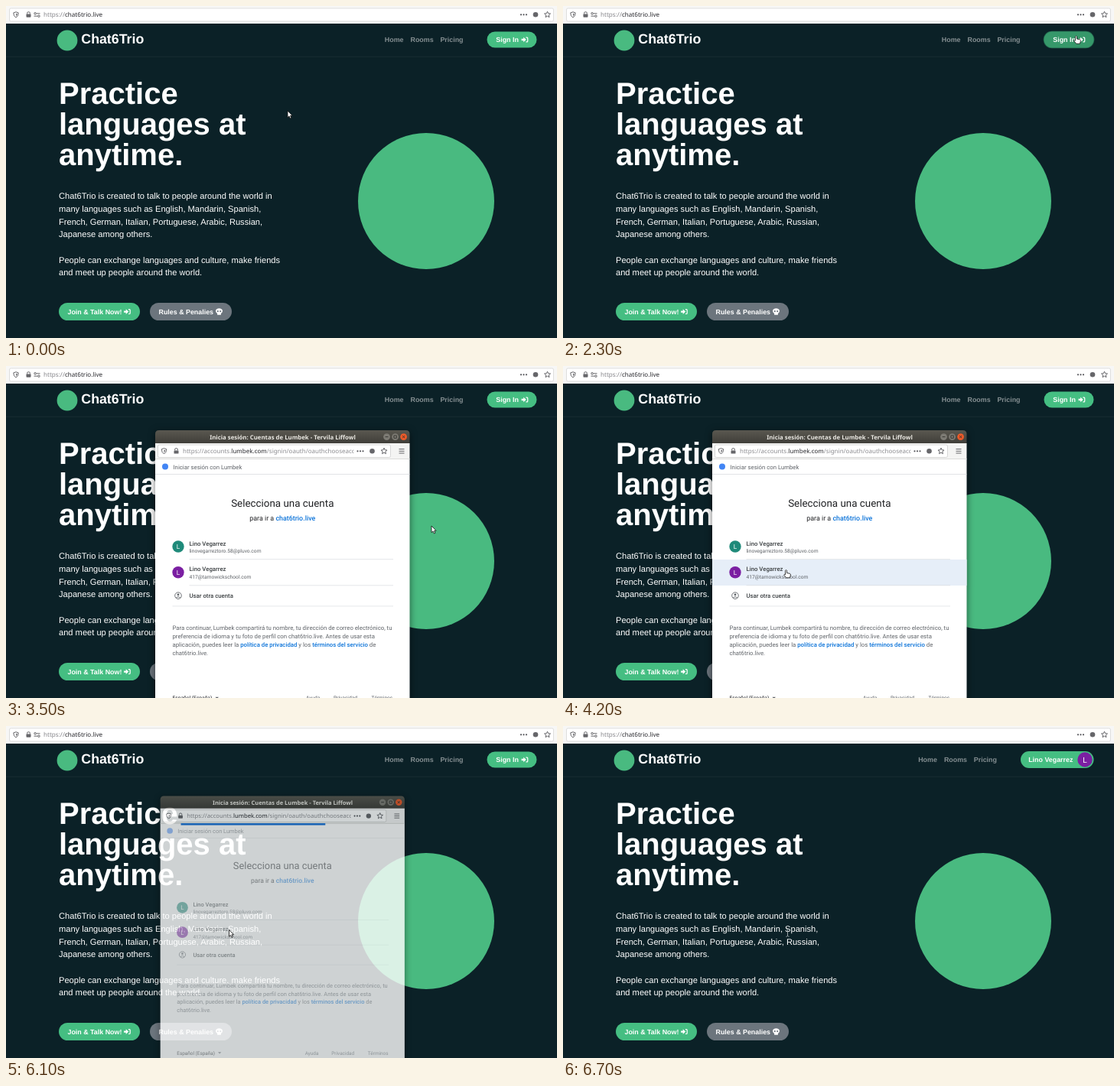
An HTML page for the animation above (8 s loop, 720 by 434 pixels).

```html
<!DOCTYPE html>
<html lang="en">
<head>
<meta charset="utf-8">
<title>Sign-in demo</title>
<style>
  html, body { margin: 0; width: 100%; height: 100%; overflow: hidden; background: #0b2127; }
  svg { display: block; width: 720px; height: 434px; }
  text { white-space: pre; text-rendering: geometricPrecision; }
  .page { font-family: "Liberation Sans", Arial, sans-serif; fill: #fff; }
  .ui { font-family: "Noto Sans", sans-serif; }
  .form { font-family: Roboto, sans-serif; fill: #5f6368; }
  .bold { font-weight: 700; }
  .mid { font-weight: 500; }
  .link { font-weight: 500; fill: #0b73d9; }
  .dark { fill: #202124; }
  .line { fill: none; stroke: #66666a; stroke-width: 1; }
  #popup { transform-box: view-box; transform-origin: 361.5px 269px; filter: drop-shadow(0 2px 5px rgba(0, 0, 0, .55)); }
</style>
</head>
<body>
<svg id="stage" viewBox="0 0 720 434"></svg>
<script>
const LOOP = 8000;
const GREEN = '#45be82', PURPLE = '#7b1fa2';
const BRAND = 'Chat6Trio', SITE = 'chat6trio.live';
const FIRM = 'Lumbek', BROWSER = 'Tervila Liffowl', USER = 'Lino Vegarrez';

const text = (x, y, size, str, cls = '', more = '') =>
  `<text x="${x}" y="${y}" font-size="${size}" class="${cls}" ${more}>${str}</text>`;
const rect = (x, y, w, h, fill, r = 0, more = '') =>
  `<rect x="${x}" y="${y}" width="${w}" height="${h}" rx="${r}" fill="${fill}" ${more}/>`;
const circle = (x, y, r, fill, more = '') =>
  `<circle cx="${x}" cy="${y}" r="${r}" fill="${fill}" ${more}/>`;
const lines = (x, y, gap, size, rows, cls) =>
  rows.map((row, i) => row && text(x, y + i * gap, size, row, cls)).join('');
const at = (x, y, body, more = '') => `<g transform="translate(${x} ${y})" ${more}>${body}</g>`;
const mid = 'text-anchor="middle"';

// Icons are centred on 0,0
const enter = '<path d="M-4.4-1.2h2.6v-2.1L1.7 0l-3.5 3.3V1.2h-2.6z" fill="#fff"/>' +
  '<path d="M1.4-2.9h1.4q.9 0 .9.9v4q0 .9-.9.9H1.4" fill="none" stroke="#fff" stroke-width="1.2"/>';
const skull = '<path d="M-2.4 4.2V2.5Q-4.5 1.2-4.5-.8C-4.5-3-2.6-4.4 0-4.4S4.5-3 4.5-.8Q4.5 1.2 2.4 2.5v1.7z" fill="#fff"/>' +
  circle(-1.7, -.5, 1.1, '#6c757d') + circle(1.7, -.5, 1.1, '#6c757d');
const shield = '<path class="line" d="M0-3.7 3.2-2.6Q3.2 2 0 3.7-3.2 2-3.2-2.6z"/><path d="M0-1.8V1.9Q1.5 1 1.6-1.3z" fill="#66666a"/>';
const lock = rect(-3, -.6, 6, 4.2, '#66666a', .7) + '<path class="line" d="M-1.8-.6V-2Q-1.8-3.5 0-3.5T1.8-2v1.4"/>';
const sliders = '<path class="line" d="M-.8-1.7H4M-4 1.7H.8"/><circle class="line" cx="-2.4" cy="-1.7" r="1.3"/><circle class="line" cx="2.4" cy="1.7" r="1.3"/>';
const dots = [-3.5, 0, 3.5].map(x => circle(x, 0, 1.1, '#55555a')).join('');
const star = `<path class="line" stroke-linejoin="round" d="M${Array.from({ length: 10 }, (_, i) => {
  const r = i % 2 ? 1.9 : 4.2, a = i * Math.PI / 5;
  return (r * Math.sin(a)).toFixed(2) + ' ' + (-r * Math.cos(a)).toFixed(2);
}).join('L')}z"/>`;
const barIcons = (x, y) => at(x, y, dots) + circle(x + 15.5, y, 3.3, '#66666a') + at(x + 31, y, star);

const topBar = rect(0, 0, 720, 23, '#f7f7f6') +
  rect(4.5, 3, 711, 17, '#fff', 2, 'stroke="#d6d6d6" stroke-width=".8"') +
  at(13, 11.5, shield) + at(29.5, 11.2, lock) + at(40.5, 11.5, sliders) +
  text(49, 14.3, 8.1, `<tspan fill="#85858a">https://</tspan>${SITE}`, 'ui', 'fill="#26262b"') +
  barIcons(676.5, 11.3);

const landing = `<g class="page">
  ${rect(0, 22, 720, 412, '#0b2127')}${rect(0, 65.8, 720, .8, '#1c3136')}
  ${circle(80, 45, 13.4, '#49ba80')}${text(98.3, 49.4, 17.78, BRAND, 'bold')}
  <g id="nav" class="bold" fill="#858f92">
    ${text(494.8, 47, 8.89, 'Home')}${text(528.5, 47, 8.89, 'Rooms')}${text(567.4, 47, 8.89, 'Pricing')}
  </g>
  <g id="signin">
    ${rect(627.7, 32.7, 66.6, 22.6, '#246b50', 11.3, 'id="ring"')}
    ${rect(628.5, 33.5, 65, 21, GREEN, 10.5, 'id="pill"')}
    ${text(640.3, 47, 8.89, 'Sign In', 'bold')}${at(678, 44, enter)}
  </g>
  <g id="account">
    ${rect(598, 33, 95.5, 22, GREEN, 11)}${text(637.3, 47, 8.89, USER, 'bold', mid)}
    <g id="avatar">${circle(682, 44, 9.7, PURPLE)}${text(682, 47.6, 10, 'L', 'form', mid + ' style="fill:#fff"')}</g>
  </g>
  ${lines(69, 128, 40, 40, ['Practice', 'languages at', 'anytime.'], 'bold')}
  ${lines(69, 252.4, 16.67, 11.11, [
    BRAND + ' is created to talk to people around the world in',
    'many languages such as English, Mandarin, Spanish,',
    'French, German, Italian, Portuguese, Arabic, Russian,',
    'Japanese among others.', '',
    'People can exchange languages and culture, make friends',
    'and meet up people around the world.'])}
  ${circle(549, 255, 89, '#49ba80')}
  ${rect(69, 388, 106, 23, GREEN, 11.5)}${text(80.5, 402.6, 8.89, 'Join &amp; Talk Now!', 'bold')}${at(158.5, 399.6, enter)}
  ${rect(188, 388, 107, 23, '#6c757d', 11.5)}${text(199.5, 402.6, 8.89, 'Rules &amp; Penalies', 'bold')}${at(278.5, 399.6, skull)}
</g>`;

const account = (y, color, mail) =>
  circle(225, y, 7.7, color) + text(225, y + 3, 8.3, 'L', '', mid + ' style="fill:#fff"') +
  text(239.5, y - 1.5, 7.78, USER, 'mid', 'style="fill:#3c4043"') + text(239.5, y + 8.2, 6.67, mail);
const rule = (x, y) => rect(x, y, 506 - x, .7, '#dadce0');

const form = `<g id="form" class="form">
  ${circle(208, 131.5, 4, '#4285f4')}${text(218.5, 134.5, 7.78, 'Iniciar sesión con ' + FIRM)}
  ${rect(195, 141, 332.5, .8, '#dadce0')}
  ${text(361.3, 183.6, 13.4, 'Selecciona una cuenta', 'dark', mid)}
  ${text(361.3, 202.3, 8.89, `para ir a <tspan class="link">${SITE}</tspan>`, 'dark', mid)}
  ${rect(195, 253, 332.5, 34, '#e6eef8', 0, 'id="hover"')}
  ${account(236, '#1f8a7a', 'linovegarreztoro.58@pluvo.com')}${rule(239.5, 252.4)}
  ${account(269.7, PURPLE, '417@tarnowickschool.com')}${rule(239.5, 286.5)}
  <circle cx="225" cy="300.2" r="4.3" fill="none" stroke="#5f6368" stroke-width=".9"/>
  ${circle(225, 298.9, 1.4, '#5f6368')}<path d="M222.2 303Q225 300.2 227.8 303" fill="none" stroke="#5f6368" stroke-width=".9"/>
  ${text(239.5, 303, 7.78, 'Usar otra cuenta', 'mid', 'style="fill:#3c4043"')}${rule(217.5, 313.6)}
  ${lines(217.5, 345.1, 11.11, 7.78, [
    `Para continuar, ${FIRM} compartirá tu nombre, tu dirección de correo electrónico, tu`,
    `preferencia de idioma y tu foto de perfil con ${SITE}. Antes de usar esta`,
    'aplicación, puedes leer la <tspan class="link">política de privacidad</tspan> y los <tspan class="link">términos del servicio</tspan> de',
    SITE + '.'])}
  ${text(217.5, 436.4, 6.67, 'Español (España)', 'dark')}<path d="M273.5 432.8h4.4l-2.2 2.4z"/>
  ${text(392, 436.4, 6.67, 'Ayuda')}${text(428, 436.4, 6.67, 'Privacidad')}${text(477.5, 436.4, 6.67, 'Términos')}
</g>`;

const popup = `<g id="popup">
  <path d="M195 102V89q0-5 5-5h322.5q5 0 5 5v13z" fill="url(#chrome)"/>
  ${text(361.5, 95.6, 7.8, '', 'ui bold', mid + ' id="title" fill="#eceae4"')}
  ${circle(497.5, 92.6, 4.4, '#7d7b74')}${circle(508.6, 92.6, 4.4, '#7d7b74')}${circle(519.6, 92.6, 4.4, '#ec5a29')}
  <path d="M495.6 92.6h3.8M506.9 90.9h3.4v3.4h-3.4zM518 91l3.2 3.2m0-3.2L518 94.2" fill="none" stroke="#34332f" stroke-width=".9"/>
  ${rect(195, 101, 332.5, 21, '#f4f4f3')}${rect(198.5, 103, 304, 16.5, '#fff', 2, 'stroke="#cfcfce" stroke-width=".8"')}
  ${at(206.5, 111.3, shield)}${at(222.5, 111, lock)}
  <g clip-path="url(#urlBox)">${text(231, 114.2, 8, '', 'ui', 'id="url" fill="#8c8c90"')}</g>
  ${barIcons(463, 111.3)}<path class="line" d="M513.5 108.6h7m-7 2.7h7m-7 2.7h7"/>
  ${rect(195, 121.4, 332.5, 332, '#fff')}${rect(195, 121, 332.5, .7, '#d0d0cf')}
  ${form}${rect(195, 121.2, 0, 2.6, '#1a73d8', 0, 'id="bar"')}
</g>`;

const pen = 'fill="#fff" stroke="#111" stroke-width=".8" stroke-linejoin="round"';
const cursors = `<g id="cursor">
  <path id="arrow" ${pen} d="M0 0v8.7l2-1.8 1.4 3.1 1.5-.7-1.4-3H6.1z"/>
  <path id="hand" ${pen} d="M-1 .8Q0-.6 1 .8V4l4 .9q1.1.4.9 1.6L5 10.3H.2L-2.8 6.6Q-2.6 5.2-1 6.2z"/>
  <path id="beam" d="M0 -1.2q1.6 0 2 1 .4-1 2-1M2-.2v8M0 8.8q1.6 0 2-1 .4 1 2 1" fill="none" stroke="#aab4b6" stroke-width=".9"/>
</g>`;

document.getElementById('stage').innerHTML = `<defs>
  <linearGradient id="chrome" x2="0" y2="1"><stop stop-color="#5a5850"/><stop offset="1" stop-color="#3e3d38"/></linearGradient>
  <clipPath id="urlBox"><rect x="231" y="103" width="223.5" height="17"/></clipPath>
</defs>${landing}${topBar}${popup}${cursors}`;

// Each row: start time, then the values held until the next row
const path = [
  [0, 368, 137], [1200, 371, 151], [1300, 386, 166], [1400, 422, 168], [1500, 472, 150],
  [1600, 532, 115], [1700, 592, 79], [1800, 640, 52], [1900, 664, 42], [2000, 670.5, 39],
  [3000, 667, 46], [3100, 650, 72], [3200, 622, 112], [3300, 590, 158], [3400, 566, 194], [3500, 556, 209],
  [3900, 500, 240], [4000, 410, 282], [4100, 325, 290], [4200, 291.5, 266.5]
];
const pose = [
  [0, 1, 0], [2400, .85, .15], [2500, .91, .5], [2600, .97, .85], [2700, 1, 1],
  [6100, .96, .8], [6200, .88, .42], [6300, 1, 0]
];
const shape = [[0, 'arrow'], [2000, 'hand'], [3000, 'arrow'], [3900, 'hand'], [4700, 'arrow'], [6200, 'beam']];
const titles = [[0, BROWSER], [3200, `Inicia sesión: Cuentas de ${FIRM} - ${BROWSER}`]];
const host = `https://accounts.<tspan fill="#26262b">${FIRM.toLowerCase()}.com</tspan>/signin/oauth`;
const urls = [[0, ''], [2800, host + '?client_id=381398'], [3200, host + '/oauthchooseaccount']];
const formFade = [[0, 0], [3300, 1], [4800, .75], [4900, .5]];
const pills = [[0, GREEN], [1900, '#41b478'], [2000, '#3ba870'], [2100, '#36986a'], [2600, '#3ba570'], [3000, GREEN]];

const held = (table, t) => table.findLast(row => row[0] <= t).slice(1);
const $ = id => document.getElementById(id);
const show = (id, on) => { $(id).style.display = on ? '' : 'none'; };
const fillText = (id, str) => { if ($(id).dataset.now !== str) { $(id).dataset.now = str; $(id).innerHTML = str; } };

// Left and right end of the loading bar; it freezes when the window closes
function progress(t) {
  if (t < 4800) return [0, 0];
  const p = (Math.min(t, 6100) - 4800) % 865;
  return [332.5 * (p / 865) ** 3.6, 332.5 * Math.min(1, (p / 600) ** 1.22)];
}

function draw(time) {
  const t = Math.floor(time / 100) * 100;
  const [x, y] = held(path, t), [kind] = held(shape, t);
  $('cursor').setAttribute('transform', `translate(${x} ${y})`);
  for (const id of ['arrow', 'hand', 'beam']) show(id, id === kind);

  const [scale, alpha] = held(pose, t);
  show('popup', alpha > 0);
  $('popup').style.transform = `scale(${scale})`;
  $('popup').style.opacity = alpha;
  fillText('title', held(titles, t)[0]);
  fillText('url', held(urls, t)[0]);
  $('form').style.opacity = held(formFade, t)[0];

  const row = Math.floor((y - 219) / 34);
  show('hover', t >= 3900 && t < 4800 && x < 528 && row >= 0 && row < 3);
  $('hover').setAttribute('y', 219 + row * 34);
  const [from, to] = progress(t);
  $('bar').setAttribute('x', 195 + from);
  $('bar').setAttribute('width', to - from);

  const signedIn = t >= 6600;
  show('ring', t >= 2200 && t < 2600);
  $('pill').setAttribute('fill', held(pills, t)[0]);
  show('signin', !signedIn);
  show('account', signedIn);
  show('avatar', t >= 6700);
  $('nav').setAttribute('transform', `translate(${signedIn ? -30.6 : 0} 0)`);
}

const start = performance.now();
function tick() {
  draw((performance.now() - start) % LOOP);
  requestAnimationFrame(tick);
}
tick();
</script>
</body>
</html>
```
